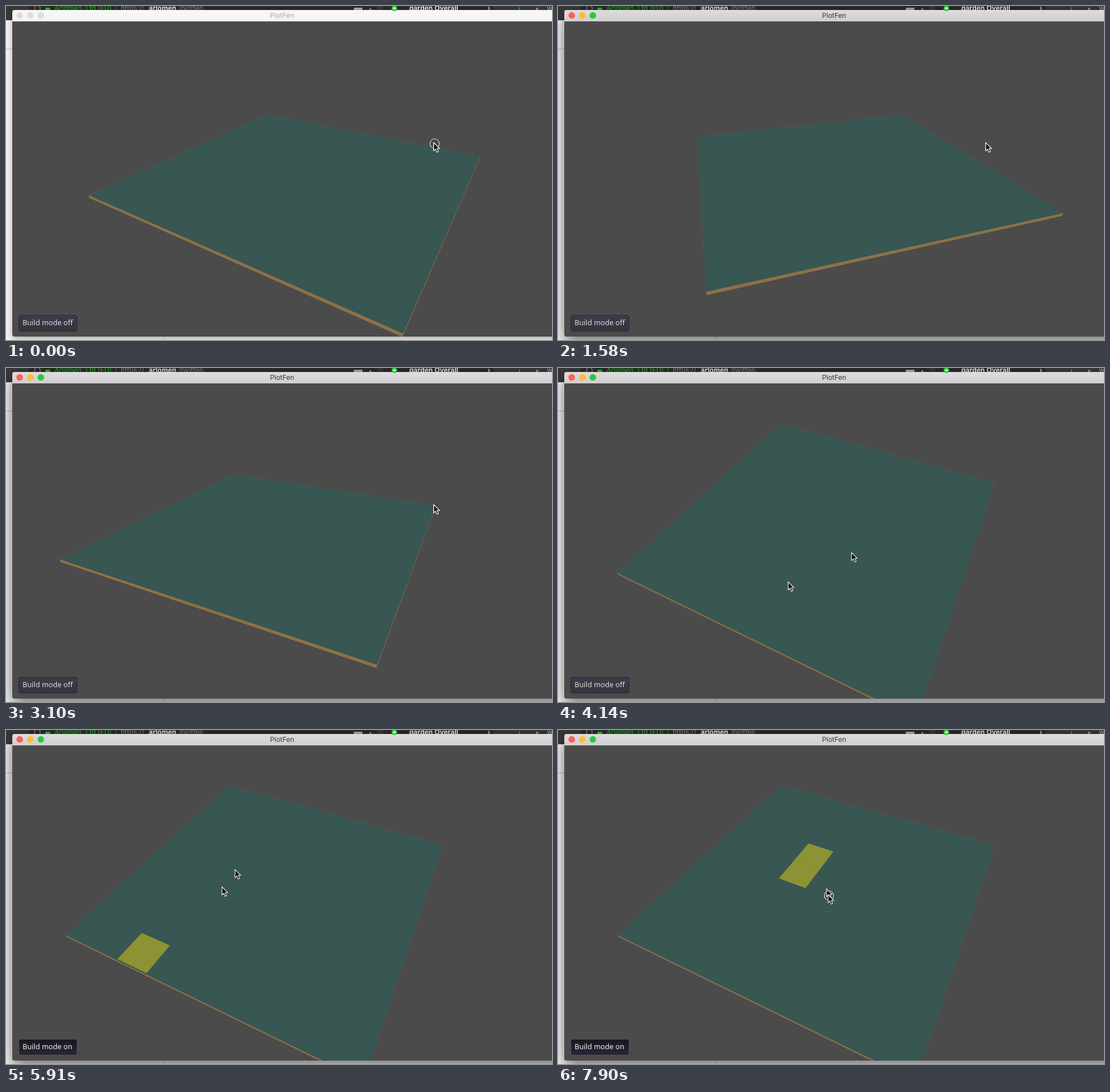
These frames come from a looping animation (956 px wide and 586 px high, 7.99 s). An HTML page with a canvas:

```html
<!DOCTYPE html>
<html lang="en">
<head>
<meta charset="utf-8">
<title>PlotFen</title>
<style>
  html, body { margin: 0; width: 100%; height: 100%; overflow: hidden; background: #f2f2f2; }
  canvas { display: block; width: 956px; height: 586px; }
</style>
</head>
<body>
<canvas id="stage" width="956" height="586"></canvas>
<script>
const ctx = document.getElementById('stage').getContext('2d');
const LOOP = 7990;
const WIN = { x: 11, y: 7, top: 27, right: 956, bottom: 580 };
const RAD = Math.PI / 180;

// Orbit camera around a point slightly off the board's middle
const CAM = { x: 483, y: 303, focal: 669, dist: 2.67 };
const OFFSET = 0.1145;
const GRID = 9, BOARD_TOP = 0.02, TILE_TOP = 0.04;
const CLICK = 90, FOCUS = 550, BUILD = 5180, HOVER_LAG = 350;

// The screen holds still between updates: [first, last, count] per burst
const STEPS = [
  [0, 0, 1], [1100, 1310, 3], [1460, 1580, 2], [2720, 2950, 3], [3100, 3220, 2],
  [3360, 3360, 1], [3870, 3870, 1], [4020, 4790, 8], [4880, 4970, 2],
  [5180, 5910, 8], [6030, 6470, 5], [6640, 7050, 5], [7230, 7900, 8]
].flatMap(([from, to, n]) =>
  Array.from({ length: n }, (_, i) => from + (to - from) * i / Math.max(1, n - 1)));

// Key points, each starting with its time
const YAW = [[1000, 32.5], [1100, 27.2], [1310, 2], [1580, -18.7], [2650, -18.7], [3100, -63.6]];
const PITCH = [[3100, 27], [3360, 48]];
const POINTER = [
  [3730, 749, 240], [3870, 711, 219], [4020, 514, 324], [4140, 393, 380],
  [4480, 160, 520], [4790, 108, 553], [5180, 97, 548], [5490, 205, 430],
  [5800, 377, 277], [5910, 401, 245], [6120, 453, 152], [6750, 432, 167],
  [7350, 452, 215], [7560, 447, 254], [7800, 470, 278], [7900, 473, 289]
];

function track(keys, t) {
  const next = keys.findIndex(key => key[0] > t);
  if (next === 0) return keys[0].slice(1);
  if (next < 0) return keys.at(-1).slice(1);
  const a = keys[next - 1], b = keys[next];
  const k = (t - a[0]) / (b[0] - a[0]);
  return a.slice(1).map((v, i) => v + (b[i + 1] - v) * k);
}

function randomizer(seed) {
  let s = seed * 7919 + 17;
  return () => (s = (s * 16807) % 2147483647) / 2147483647;
}

function cameraAt(t) {
  const [yaw] = track(YAW, t), [pitch] = track(PITCH, t);
  const sa = Math.sin(yaw * RAD), ca = Math.cos(yaw * RAD);
  const sp = Math.sin(pitch * RAD), cp = Math.cos(pitch * RAD);
  return {
    seed: Math.round(yaw + pitch * 3 + 100),
    project(u, v, h) {
      u += OFFSET;
      v += OFFSET;
      const side = u * ca + v * sa, ahead = v * ca - u * sa;
      const k = CAM.focal / (CAM.dist + ahead * cp - h * sp);
      return [CAM.x + side * k, CAM.y - (h * cp + ahead * sp) * k];
    },
    unproject(x, y, h) {
      const dx = (x - CAM.x) / CAM.focal, dy = (y - CAM.y) / CAM.focal;
      const k = (CAM.dist * sp - h) / (sp + dy * cp);
      const side = dx * k, ahead = (cp - dy * sp) * k - CAM.dist * cp;
      return [side * ca - ahead * sa - OFFSET, side * sa + ahead * ca - OFFSET];
    }
  };
}

function polygon(points, fill) {
  ctx.beginPath();
  points.forEach(([x, y]) => ctx.lineTo(x, y));
  ctx.closePath();
  ctx.fillStyle = fill;
  ctx.fill();
}

function rect(x, y, w, h, fill) {
  ctx.fillStyle = fill;
  ctx.fillRect(x, y, w, h);
}

function disc(x, y, r, fill) {
  ctx.beginPath();
  ctx.arc(x, y, r, 0, 7);
  ctx.fillStyle = fill;
  ctx.fill();
}

function text(str, x, y, font, fill, align = 'left') {
  ctx.font = font;
  ctx.textAlign = align;
  ctx.fillStyle = fill;
  ctx.fillText(str, x, y);
}

function blend(y0, y1, from, to) {
  const g = ctx.createLinearGradient(0, y0, 0, y1);
  g.addColorStop(0, from);
  g.addColorStop(1, to);
  return g;
}

function drawBackdrop() {
  rect(0, 0, 956, 586, '#f4f4f4');
  rect(0, 0, 956, 25, '#383838');
  rect(40, 0, 610, 7, '#2a2a2a');
  rect(661, 0, 193, 7, '#2a2a2a');
  rect(0, 75, 12, 1, '#bdbdbd');
  rect(277, 580, 1, 6, '#c4c4c4');

  // Lower edge of a browser bar, mostly hidden by the window
  const small = '12px Inter, sans-serif', bold = 'bold 12px Inter, sans-serif';
  ctx.strokeStyle = '#aaa';
  ctx.lineWidth = 1;
  ctx.beginPath();
  ctx.arc(55, 4, 5, 0, 7);
  ctx.stroke();
  rect(69, 3, 8, 6, '#1fc01f');
  text('Arlomen, Ltd (EU)', 85, 8, small, '#1fb51f');
  rect(192, 0, 1, 7, '#1f8a1f');
  text('https://', 201, 8, small, '#8a8a8a');
  text('arlomen', 250, 8, bold, '#e4e4e4');
  text('/plotfen', 302, 8, small, '#8a8a8a');
  rect(609, 3, 15, 4, '#a8a8a8');
  text('^', 635, 12, bold, '#b0b0b0');
  text('garden Overall', 706, 8, bold, '#e8e8e8');
  text('›', 843, 8, bold, '#ccc');
  rect(898, 2, 2, 5, '#3d78b4');
  rect(928, 3, 4, 4, '#888');
  text('w', 947, 8, small, '#aaa');
}

function drawWindow(active) {
  ctx.save();
  ctx.shadowColor = active ? 'rgba(0,0,0,.55)' : 'rgba(0,0,0,.3)';
  ctx.shadowBlur = active ? 26 : 12;
  ctx.shadowOffsetY = active ? 9 : 4;
  ctx.beginPath();
  ctx.roundRect(WIN.x, WIN.y, 965, WIN.bottom - WIN.y, 4);
  ctx.fillStyle = '#4b4b4b';
  ctx.fill();
  ctx.restore();

  ctx.beginPath();
  ctx.roundRect(WIN.x, WIN.y, 965, WIN.top - WIN.y, [4, 4, 0, 0]);
  ctx.fillStyle = active ? blend(7, 27, '#dedcde', '#d0ced0') : '#f6f6f6';
  ctx.fill();
  const lights = active ? ['#ff5f57', '#ffbd2e', '#28c940'] : Array(3).fill('#dcdcdc');
  lights.forEach((c, i) => disc(24 + i * 18.5, 16.5, 5.7, c));
  text('PlotFen', 483.5, 21, '12px Inter, sans-serif', active ? '#3a3a3a' : '#a9a9a9', 'center');

  disc(680, 4, 5, '#25c32f');
  rect(677, 3.4, 6, 1.3, '#fff');
  rect(679.4, 1, 1.3, 6, '#fff');
}

function drawBoard({ project, seed }) {
  const corners = [[-1, -1], [1, -1], [1, 1], [-1, 1]];
  const at = h => corners.map(([u, v]) => project(u, v, h));
  const top = at(BOARD_TOP), base = at(0);

  corners.forEach((_, i) => {
    const j = (i + 1) % 4;
    polygon([top[i], top[j], base[j], base[i]], '#8d7147');
  });
  polygon(top, '#385652');

  // Faint specks where the cells meet
  const random = randomizer(seed);
  for (let i = 0; i < 40; i++) {
    const seam = (1 + Math.floor(random() * (GRID - 1))) * 2 / GRID - 1;
    const along = random() * 1.9 - 0.95;
    const [x, y] = i % 2 ? project(seam, along, BOARD_TOP) : project(along, seam, BOARD_TOP);
    rect(Math.round(x), Math.round(y), 1, 1, 'rgba(122,142,52,.75)');
  }
}

// Lights up the cell the pointer was over a moment before
function drawTile({ project, unproject }, t) {
  const [x, y] = track(POINTER, t - HOVER_LAG);
  const cell = unproject(x, y, BOARD_TOP).map(p => Math.floor((p + 1) * GRID / 2));
  if (cell.some(n => n < 0 || n >= GRID)) return;
  const corner = (i, j) => project((cell[0] + i) * 2 / GRID - 1, (cell[1] + j) * 2 / GRID - 1, TILE_TOP);
  polygon([corner(0, 0), corner(1, 0), corner(1, 1), corner(0, 1)], '#8d9334');
}

function drawButton(t) {
  const on = t >= BUILD, hover = t >= 4690 && !on;
  ctx.beginPath();
  ctx.roundRect(22.5, 542.5, 102, 28, 3);
  ctx.fillStyle = on ? blend(543, 570, '#18181e', '#292833')
    : hover ? blend(543, 570, '#4a4856', '#403e4a') : blend(543, 570, '#3e3c49', '#35333e');
  ctx.fill();
  ctx.lineWidth = 1;
  ctx.strokeStyle = on ? '#4b5668' : '#2c2a33';
  ctx.stroke();
  text('Build mode ' + (on ? 'on' : 'off'), 29, 560, '12.7px "Noto Sans", sans-serif', on ? '#f0f0f0' : '#dcdcdc');
}

function drawArrow([x, y]) {
  ctx.save();
  ctx.translate(x, y);
  ctx.beginPath();
  [[0, 0], [0, 13.8], [3.1, 10.9], [5.4, 16.4], [7.9, 15.4], [5.6, 10.1], [9.8, 9.8]]
    .forEach(([px, py]) => ctx.lineTo(px, py));
  ctx.closePath();
  ctx.fillStyle = '#000';
  ctx.fill();
  ctx.strokeStyle = '#fff';
  ctx.lineWidth = 1.1;
  ctx.stroke();
  ctx.restore();
}

function drawClick([x, y]) {
  ctx.beginPath();
  ctx.arc(x + 1.5, y + 1.5, 8.3, 0, 7);
  ctx.strokeStyle = 'rgba(0,0,0,.6)';
  ctx.lineWidth = 2.6;
  ctx.stroke();
  ctx.strokeStyle = '#f2f2f2';
  ctx.lineWidth = 1.2;
  ctx.stroke();
}

function draw(t) {
  const n = STEPS.findLastIndex(step => step <= t);
  const now = STEPS[n], before = STEPS[Math.max(0, n - 1)];
  const camera = cameraAt(now);
  const tip = track(POINTER, now);

  drawBackdrop();
  drawWindow(t >= FOCUS);
  ctx.save();
  ctx.beginPath();
  ctx.rect(WIN.x, WIN.top, WIN.right - WIN.x, WIN.bottom - WIN.top);
  ctx.clip();
  drawBoard(camera);
  // Every update still shows the one before it
  if (now >= BUILD) [before, now].forEach(time => drawTile(camera, time));
  drawButton(now);
  drawArrow(track(POINTER, before));
  if (t < CLICK || t >= 7900) drawClick(tip);
  drawArrow(tip);
  ctx.restore();
}

const start = performance.now();
function tick() {
  draw((performance.now() - start) % LOOP);
  requestAnimationFrame(tick);
}
tick();
</script>
</body>
</html>
```
